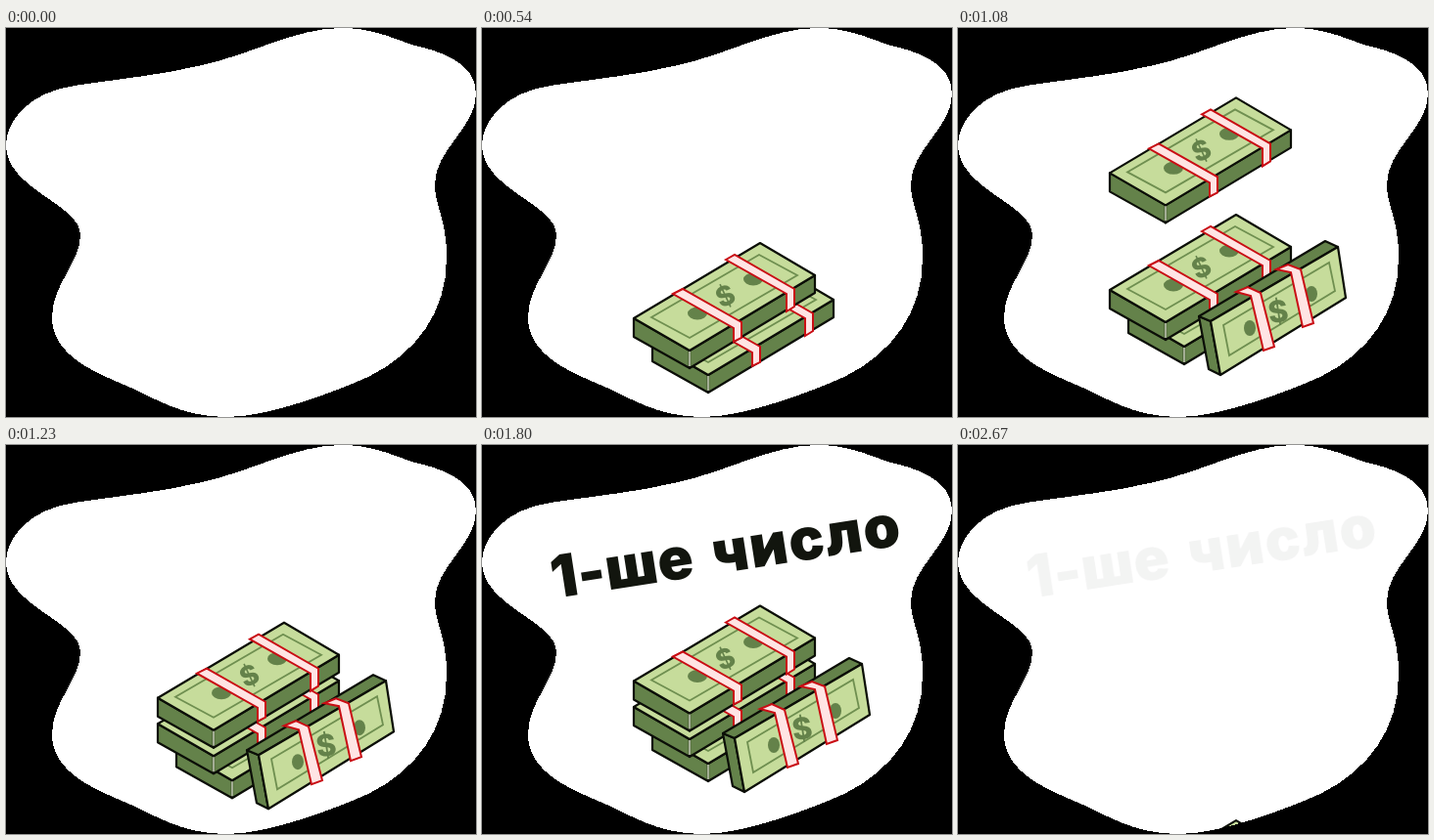
An HTML page for the animation above (2700 ms loop, 480 by 398 pixels).

```html
<!DOCTYPE html>
<html lang="uk">
<head>
<meta charset="utf-8">
<style>
html, body { margin: 0; width: 100%; height: 100%; overflow: hidden; background: #000; }
svg { display: block; width: 100vw; height: 100vh; }
.edge { stroke: #0b0e07; stroke-width: 2.2; stroke-linejoin: round; }
.light { fill: #c6dc9b; }
.dark { fill: #64824a; }
.rim { fill: none; stroke: #6f8f50; stroke-width: 1.8; }
.seam { stroke: #e6f2d2; stroke-width: 1.4; }
.ink { fill: #64824a; }
.band { fill: #ffe4e4; stroke: #c90d14; stroke-width: 2; }
.sign { font: 800 28px Inter, sans-serif; fill: #64824a; text-anchor: middle; }
.title { font: 900 60px Inter, sans-serif; fill: #12150e; }
</style>
</head>
<body>
<svg viewBox="0 0 480 398">
  <defs>
    <g id="flat">
      <path class="dark edge" d="M155 148L212 181V199L155 167Z"/>
      <path class="dark edge" d="M212 181L340 104V122L212 199Z"/>
      <path class="light edge" d="M284 71L340 104L212 181L155 148Z"/>
      <path class="seam" d="M212 182V197"/>
      <path class="rim" d="M283 83L322 104L212 168L173 147Z"/>
      <ellipse class="ink" cx="220" cy="143" rx="10" ry="6.5"/>
      <ellipse class="ink" cx="277" cy="108" rx="10" ry="6.5"/>
      <text class="sign" transform="translate(248.5 125) rotate(-25)" y="10">$</text>
      <path class="band" d="M249 88L258 83L319 118V136L311 141V123Z"/>
      <path class="band" d="M195 123L205 118L265 152V168L257 172V158Z"/>
    </g>
    <g id="tilted">
      <path class="dark edge" d="M246 295L258 300L268 355L256 349Z"/>
      <path class="dark edge" d="M246 295L375 218L388 224L258 300Z"/>
      <path class="light edge" d="M258 300L388 224L396 276L268 355Z"/>
      <path class="rim" d="M271 304L379 240L385 269L277 335Z"/>
      <ellipse class="ink" cx="298" cy="307" rx="6" ry="8"/>
      <ellipse class="ink" cx="361" cy="272" rx="6" ry="8"/>
      <text class="sign" transform="translate(327 290) rotate(-9)" y="11" style="font-size:31px">$</text>
      <path class="band" d="M284 270L296 265L309 271L323 326L312 330L299 274Z"/>
      <path class="band" d="M325 247L337 242L350 247L363 302L352 306L340 250Z"/>
    </g>
  </defs>
  <rect width="480" height="398" fill="#fff"/>
  <g id="pile">
    <g><use href="#flat" x="19" y="145"/></g>
    <g><use href="#flat" y="120"/></g>
    <g><use href="#flat" y="93.5"/></g>
    <g><use href="#tilted"/></g>
  </g>
  <g id="title" class="title">
    <text transform="translate(73.5 157) rotate(-8.8)" letter-spacing=".3">1-ше</text>
    <text transform="translate(238 132) rotate(-8.8)" letter-spacing="1.5">число</text>
  </g>
  <path fill-rule="evenodd" shape-rendering="crispEdges" d="M-2 -2H482V400H-2Z
    M342 0C372 0 392 9 414 17C440 23 481 34 480 68C480 102 438 124 438 160
    C438 184 450 194 450 235C450 290 420 332 370 357C338 371 270 398 225 398
    C180 398 150 378 130 369C95 354 47 337 47 296C47 262 76 240 76 212
    C76 180 0 165 0 120C0 96 22 66 70 59C115 52 160 48 200 38C248 28 296 0 342 0Z"/>
</svg>
<script>
const LOOP = 2700, STEP = 30;
const pile = document.getElementById('pile');
const title = document.getElementById('title');

// Each bundle falls, lands and pushes the pile down for a moment.
const drops = [
  { start: 70, land: 200, rest: 300, height: 320, push: 53 },
  { start: 370, land: 520, rest: 600, height: 300, push: 29 },
  { start: 889, land: 1125, rest: 1290, height: 270, push: 29 },
  { start: 610, land: 715, rest: 780, height: 370, push: 29 }
];

const clamp = x => Math.min(1, Math.max(0, x));
const span = (t, a, b) => clamp((t - a) / (b - a));
const smooth = x => x * x * (3 - 2 * x);
const bob = (d, t) => d.push * Math.sin(Math.PI * Math.sqrt(span(t, d.land, d.rest)));

function draw(t) {
  const push = drops.reduce((sum, d) => sum + bob(d, t), 0);
  const out = span(t, 2400, 2700);
  const exit = 330 * (1.783 * out ** 3 - 0.783 * out ** 2);
  pile.setAttribute('transform', `translate(0 ${exit.toFixed(2)})`);

  drops.forEach((d, i) => {
    const node = pile.children[i];
    const fall = span(t, d.start, d.land);
    const y = fall < 1 ? -d.height * (1 - fall * fall) : push;
    node.setAttribute('visibility', t > d.start ? 'visible' : 'hidden');
    node.setAttribute('transform', `translate(0 ${y.toFixed(2)})`);
  });

  title.setAttribute('opacity', span(t, 1530, 1800) * (1 - smooth(span(t, 2405, 2710))));
}

const begin = performance.now();
function tick() {
  const t = (performance.now() - begin) % LOOP;
  draw(Math.floor(t / STEP) * STEP);
  requestAnimationFrame(tick);
}
draw(0);
requestAnimationFrame(tick);
</script>
</body>
</html>
```
